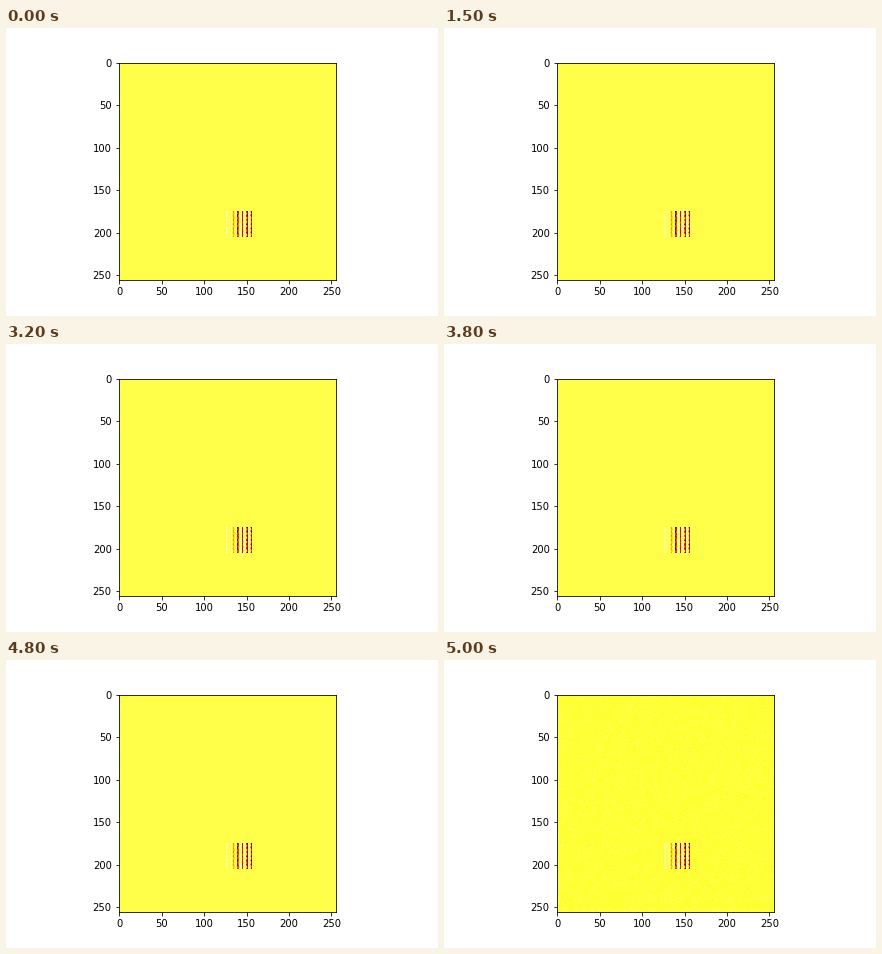
A matplotlib script for the animation above (5.1 s loop, 432 px wide and 288 px high).

```python
import numpy as np
import matplotlib.pyplot as plt
from matplotlib.animation import FuncAnimation

FRAMES, STEP_MS = 51, 100
SIZE = 256                      # field is SIZE x SIZE cells
TOP, LEFT, SIDE = 175, 126, 30  # the striped patch
BASE = 0.82                     # resting level on the colour scale
BAR_GAP, ROW_GAP = 5.3, 5       # spacing of the stripes and of their dashes

rng = np.random.default_rng(7)
noise = rng.normal(size=(SIZE, SIZE))
rows = np.arange(SIDE)[:, None]
cols = np.arange(SIDE)[None, :]
grain = rng.normal(size=(SIDE, SIDE))


def patch(i):
    """Stripes that darken to the right, broken into flickering dashes."""
    phase = 2 * np.pi * i / 25
    dash = np.cos(2 * np.pi * rows / ROW_GAP + 0.3 * np.sin(phase))
    wave = np.cos(2 * np.pi * (cols - 8) / BAR_GAP + 0.25 * dash)
    strength = np.clip((cols - 5) / 8, 0, 1)
    dark = strength * (0.56 + 0.13 * dash + 0.03 * np.sin(phase + cols / 3))
    pale = 0.09 + 0.04 * dash
    level = BASE - dark * np.maximum(wave, 0) + pale * np.maximum(-wave, 0)
    return level + 0.05 * strength * grain


def field(i):
    growth = 0.014 * 3.5 ** (i - FRAMES + 1) if i >= 43 else 0
    img = BASE + growth * (noise - 1.4)
    img[TOP:TOP + SIDE, LEFT:LEFT + SIDE] = patch(i)
    return np.clip(img, 0, 1)


fig, ax = plt.subplots(figsize=(6, 4), dpi=72, facecolor="white")
fig.subplots_adjust(left=0.125, right=0.9, bottom=0.125, top=0.88)
image = ax.imshow(field(0), cmap="hot", vmin=0, vmax=1, interpolation="nearest")
ax.set_xticks(range(0, SIZE, 50))
ax.set_yticks(range(0, SIZE, 50))


def update(i):
    image.set_data(field(i))
    return [image]


anim = FuncAnimation(fig, update, frames=FRAMES, interval=STEP_MS,
                     repeat=True, repeat_delay=0)
plt.show()
```
